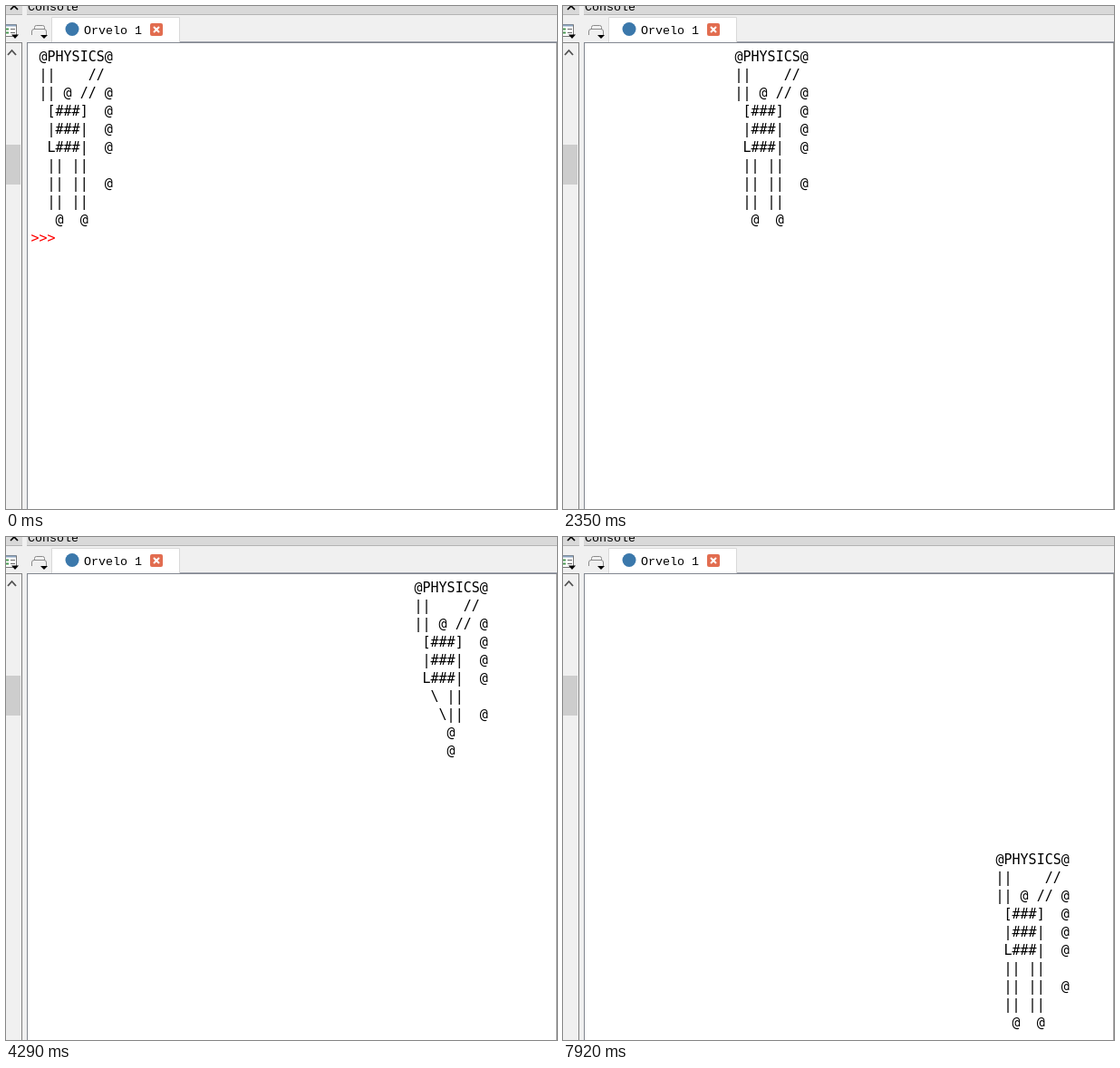
Animation, 608 px wide and 555 px high, one loop 8 s. Source, as an HTML page:

```html
<!DOCTYPE html>
<html lang="en">
<head>
<meta charset="utf-8">
<title>Console walker</title>
<style>
  html, body { margin: 0; width: 100%; height: 100%; overflow: hidden; background: #f0f0f0; }
  #stage { position: relative; width: 608px; height: 555px; overflow: hidden; }
  svg { position: absolute; left: 0; top: 0; }
  .ui { font: 13.33px "Liberation Mono", monospace; fill: #000; }
  pre {
    position: absolute; margin: 0; color: #000;
    font: 15px/20px "DejaVu Sans Mono", monospace;
    font-variant-ligatures: none;
  }
  #prompt { left: 27.5px; top: 246px; }
  #prompt b { font-weight: 400; color: #f00; }
</style>
</head>
<body>
<div id="stage">
  <svg width="608" height="555" viewBox="0 0 608 555">
    <!-- title bars -->
    <g shape-rendering="crispEdges">
      <path fill="#d9d9d9" d="M0 0H18V9H0zM23 0H608V9H23z"/>
      <path fill="#b4b4b4" d="M0 9H18V10H0zM23 9H608V10H23z"/>
    </g>
    <path d="M5 -4L13 4M13 -4L5 4" stroke="#000" stroke-width="1.7"/>
    <text class="ui" x="24" y="5">Console</text>

    <!-- left pane -->
    <g shape-rendering="crispEdges">
      <path fill="#828282" d="M0 40H18V555H17V41H0z"/>
      <path fill="#cdcdcd" d="M0 153H16V197H0z"/>
    </g>
    <path d="M2 54L6.500 49L11 54" fill="none" stroke="#505050" stroke-width="1.8"/>
    <path d="M-3 20.500H11.500V33.500H-3z" fill="#fff" stroke="#777"/>
    <path d="M0 21.500H11" stroke="#8ba3bf" stroke-width="2"/>
    <path d="M0 25.500H3M0 29.500H3" stroke="#4d9a55" stroke-width="2"/>
    <path d="M5 25.500H10M5 29.500H10" stroke="#666"/>
    <path d="M6 31.500H14L10 36z"/>

    <!-- tab bar -->
    <path d="M31.500 26V23.500Q31.500 21.500 33.500 21.500H40.500Q42.500 21.500 42.500 23.500V26M28.500 32V28Q28.500 25.500 31 25.500H42Q44.500 25.500 44.500 28V32"
      fill="none" stroke="#8b8b8b"/>
    <path d="M38 32H46L42 36z"/>
    <path d="M50.500 41V12.500H191.500V41" fill="#fff" stroke="#d9d9d9"/>
    <path d="M192 39H608V40H192z" fill="#a0a3ad" shape-rendering="crispEdges"/>
    <circle cx="73" cy="25.500" r="7.500" fill="#3b78ab"/>
    <text class="ui" x="86" y="31">Orvelo 1</text>
    <rect x="159" y="19" width="14" height="14" rx="2" fill="#e26d50"/>
    <path d="M163 23L169 29M169 23L163 29" stroke="#fff" stroke-width="2"/>

    <!-- console -->
    <g shape-rendering="crispEdges">
      <path fill="#828790" d="M23 40H608V555H23z"/>
      <path fill="#a0a0a0" d="M607 41H608V555H607z"/>
      <path fill="#fff" d="M24 41H607V555H24z"/>
    </g>
  </svg>

  <pre id="prompt"></pre>
  <pre id="walker"></pre>

  <svg width="608" height="555" viewBox="0 0 608 555">
    <path id="beam" d="M-3.500 -9.500H-1L0 -8.500L1 -9.500H3.500M0 -8.500V8.500M-3.500 9.500H-1L0 8.500L1 9.500H3.500"
      fill="none" stroke="#000" stroke-width="1.500"/>
    <path id="arrow" d="M.5 .5V16L4 12.500L6.500 18.500L9 17.500L6.500 11.500H11.500z" fill="#fff" stroke="#000"/>
  </svg>
</div>
<script>
  const LOOP = 8000;
  const $ = id => document.getElementById(id);

  const body = ['@PHYSICS@', '||    //', '|| @ // @', ' [###]  @', ' |###|  @', ' L###|  @'];
  const standing = [...body, ' || ||', ' || ||  @', ' || ||', '  @  @'];
  const striding = [...body, '  \\ ||', '   \\||  @', '    @', '    @'];
  // the "!" is the last column of every row below the name
  const quiet = standing.map((row, i) => i ? row.slice(0, 8) : row);
  const poses = {
    stand: standing.join('\n'),
    stride: striding.join('\n'),
    quiet: quiet.join('\n'),
    none: ''
  };

  // time, column, row, pose
  const steps = [
    [0, 1, 0, 'stand'], [860, 1, 0, 'none'],
    [1630, 7, 0, 'stride'], [1780, 8, 0, 'stand'], [1930, 12, 0, 'stand'],
    [2080, 13, 0, 'stride'], [2200, 15, 0, 'stride'], [2350, 18, 0, 'stand'],
    [2470, 20, 0, 'stand'], [2590, 22, 0, 'stand'], [2740, 23, 0, 'stride'],
    [2860, 26, 0, 'stand'], [2980, 26, 0, 'none'],
    [3380, 34, 0, 'stand'], [3530, 36, 0, 'stand'], [3650, 38, 0, 'stand'],
    [3800, 41, 0, 'stride'], [4050, 43, 0, 'stride'], [4170, 45, 0, 'stride'],
    [4290, 47, 0, 'stride'], [4440, 49, 0, 'stride'],
    [4560, 50, 0, 'quiet'], [4840, 50, 0, 'stand'], [5120, 50, 0, 'none'],
    [5270, 50, 0, 'quiet'], [5540, 50, 0, 'stand'], [5930, 50, 0, 'none'],
    [6050, 50, 0, 'quiet'], [6290, 50, 0, 'stand'],
    [6440, 50, 1, 'stand'], [6590, 50, 2, 'stride'], [6710, 50, 3, 'stand'],
    [6830, 50, 4, 'stride'], [6950, 50, 6, 'stride'], [7070, 50, 8, 'stride'],
    [7220, 50, 11, 'stand'], [7340, 50, 13, 'stand'],
    [7490, 50, 15, 'quiet'], [7920, 50, 15, 'stand']
  ];

  const mark = '<b>&gt;&gt;&gt; </b>';
  const command = "runfile(r'D:\\lessons\\motion\\walker.py', wdir=r'D:\\lessons\\\nmotion')";
  const prompts = [[0, mark], [710, mark + command], [860, '']];

  // time, x, y, shape
  const pointer = [
    [0, 0, 0, ''], [5660, 1, 488, 'arrow'], [5780, 180, 487, 'beam'],
    [5930, 236, 474, 'beam'], [6050, 280, 462, 'beam'], [6170, 312, 452, 'beam'],
    [6290, 332, 445, 'beam'], [6440, 0, 0, '']
  ];

  const at = (table, t) => table.findLast(step => step[0] <= t);
  const last = {};

  function change(key, step, draw) {
    if (last[key] === step) return;
    last[key] = step;
    draw(step);
  }

  function render(t) {
    change('walker', at(steps, t), ([, col, row, pose]) => {
      const el = $('walker');
      el.textContent = poses[pose];
      el.style.left = 27.5 + 9 * col + 'px';
      el.style.top = 46 + 20 * row + 'px';
    });
    change('prompt', at(prompts, t), ([, html]) => { $('prompt').innerHTML = html; });
    change('pointer', at(pointer, t), ([, x, y, shape]) => {
      for (const id of ['beam', 'arrow']) {
        $(id).style.display = id === shape ? '' : 'none';
        $(id).setAttribute('transform', `translate(${x} ${y})`);
      }
    });
  }

  const start = performance.now();
  function tick() {
    render((performance.now() - start) % LOOP);
    requestAnimationFrame(tick);
  }
  tick();
</script>
</body>
</html>
```
